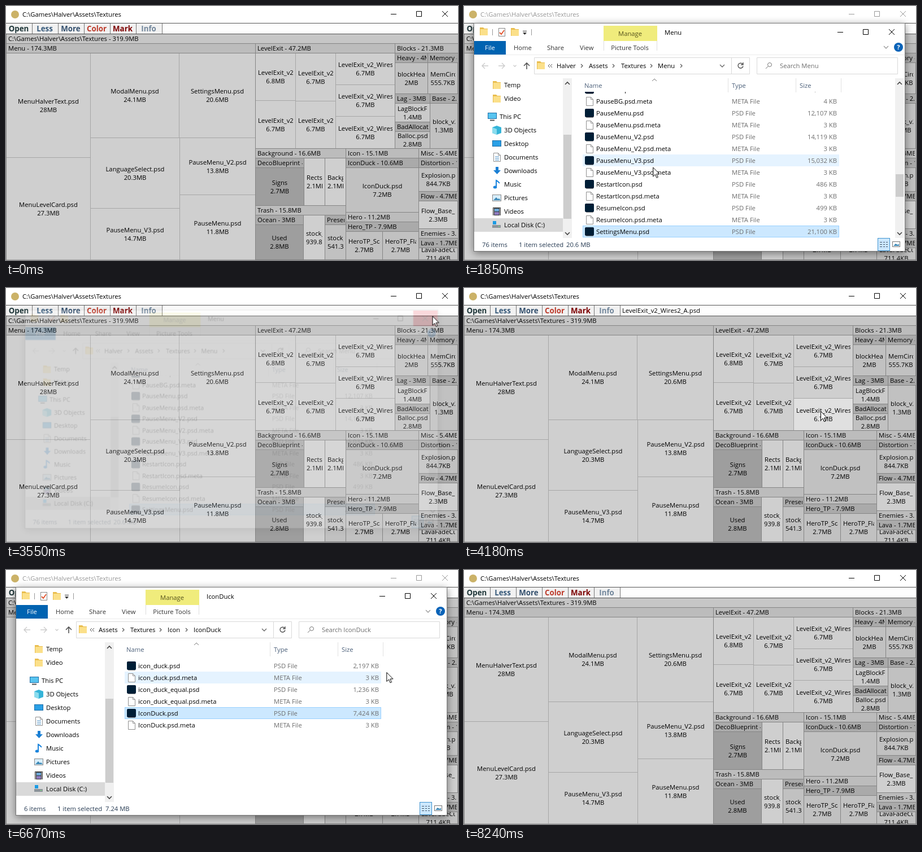
Animation, 800 px wide and 450 px high, one loop 8270 ms. Source, as an HTML page:

```html
<!DOCTYPE html>
<html lang="en">
<head>
<meta charset="utf-8">
<title>Disk usage treemap</title>
<style>
  html, body { margin: 0; width: 800px; height: 450px; overflow: hidden; background: #fff; }
  #stage { display: block; font: 11.25px "Open Sans", "Noto Sans", sans-serif; }
  text { white-space: pre; }
  .tool { font-weight: 700; font-size: 13.3px; }
  .win { transform-origin: 399px 232px; opacity: 0; }
  .frame { filter: drop-shadow(0 3px 7px rgba(0, 0, 0, .45)); }
  .hot { fill: #e0e0e0; }
</style>
</head>
<body>
<svg id="stage" width="800" height="450" viewBox="0 0 800 450"></svg>
<script>
const LOOP = 8270;
const stage = document.getElementById('stage');
const $ = sel => document.querySelector(sel);

// Drawing helpers; text is placed by its vertical middle.
const rect = (x, y, w, h, fill, more = '') =>
  `<rect x="${x}" y="${y}" width="${w}" height="${h}" fill="${fill}" ${more}/>`;
const text = (x, y, s, fill = '#000', more = '') =>
  `<text x="${x}" y="${y + 4}" fill="${fill}" ${more}>${s}</text>`;
const line = (d, stroke = '#777', w = 1) =>
  `<path d="${d}" fill="none" stroke="${stroke}" stroke-width="${w}"/>`;
const shape = (d, fill, more = '') => `<path d="${d}" fill="${fill}" ${more}/>`;
const mid = 'text-anchor="middle"', end = 'text-anchor="end"';

const captions = (x, y, color) => line(
  `M${x} ${y + .5}h10M${x + 45.5} ${y - 4.5}h9v9h-9zM${x + 91} ${y - 5}l10 10m0-10l-10 10`, color);

// Treemap: headers are [x, y, right, depth, label]
const headers = [
  [1, 50, 800, 0, 'C:\\Games\\Halver\\Assets\\Textures - 319.9MB'],
  [1, 67, 441, 1, 'Menu - 174.3MB'], [442, 67, 688, 1, 'LevelExit - 47.2MB'],
  [689, 67, 800, 1, 'Blocks - 21.3MB'], [689, 84, 746, 2, 'Heavy - 4MB'],
  [747, 84, 800, 2, 'Memory - 1MB'], [689, 156, 750, 2, 'Lag - 3MB'],
  [751, 156, 800, 2, 'Base - 2.6MB'], [689, 206, 750, 2, 'BadAllocation - 2.8MB'],
  [442, 253, 601, 1, 'Background - 16.6MB'], [602, 253, 730, 1, 'Icon - 15.1MB'],
  [731, 253, 800, 1, 'Misc - 5.4MB'], [442, 270, 527, 2, 'DecoBlueprint - 4MB'],
  [602, 270, 730, 2, 'IconDuck - 10.6MB'], [731, 270, 800, 2, 'Distortion - 1MB'],
  [731, 329, 800, 2, 'Flow - 4.7MB'], [442, 354, 601, 1, 'Trash - 15.8MB'],
  [602, 366, 730, 1, 'Hero - 11.2MB'], [442, 371, 526, 2, 'Ocean - 3MB'],
  [565, 371, 601, 2, 'Present - 1MB'], [602, 383, 730, 2, 'Hero_TP - 7.9MB'],
  [731, 395, 800, 1, 'Enemies - 3.1MB'], [731, 412, 800, 2, 'Lava - 1.7MB']
];
const LIGHT = '#cfcfcf', GRAY = '#c1c1c1', DARK = '#9e9e9e';
// [left, top, right, bottom, name, size, fill]
const cells = [
  [1, 84, 149, 268, 'MenuHalverText.psd', '28MB'], [1, 269, 149, 449, 'MenuLevelCard.psd', '27.3MB'],
  [150, 84, 306, 233, 'ModalMenu.psd', '24.1MB'], [307, 84, 441, 233, 'SettingsMenu.psd', '20.6MB'],
  [150, 234, 307, 358, 'LanguageSelect.psd', '20.3MB'], [150, 359, 307, 449, 'PauseMenu_V3.psd', '14.7MB'],
  [308, 234, 441, 334, 'PauseMenu_V2.psd', '13.8MB'], [308, 335, 441, 449, 'PauseMenu.psd', '11.8MB'],
  [442, 84, 512, 167, 'LevelExit_v2_A.psd', '6.8MB'], [442, 168, 512, 252, 'LevelExit_v2_B.psd', '6.7MB'],
  [513, 84, 583, 168, 'LevelExit_v2_C.psd', '6.7MB'], [513, 169, 583, 252, 'LevelExit_v2_D.psd', '6.7MB'],
  [584, 84, 688, 139, 'LevelExit_v2_Wires1_A.psd', '6.7MB'],
  [584, 140, 688, 195, 'LevelExit_v2_Wires1_B.psd', '6.7MB'],
  [584, 196, 688, 252, 'LevelExit_v2_Wires2_A.psd', '6.7MB'],
  [689, 101, 746, 155, 'blockHeavy.psd', '2MB', GRAY], [747, 101, 799, 155, 'MemCircle.psd', '555.7KB', GRAY],
  [689, 173, 750, 205, 'LagBlockFill.psd', '1.4MB', '#cacaca'], [751, 173, 799, 252, 'block_v2.psd', '1.3MB', GRAY],
  [689, 223, 750, 252, 'Balloc.psd', '2.8MB', GRAY], [442, 287, 527, 353, 'Signs', '2.7MB', DARK],
  [528, 270, 564, 353, 'Rects.psd', '2.1MB'], [565, 270, 601, 353, 'Background.psd', '2.1MB'],
  [442, 388, 526, 449, 'Used', '2.8MB', DARK], [527, 371, 564, 449, 'stock_1.psd', '939.8KB'],
  [565, 388, 601, 449, 'stock_2.psd', '541.3KB', GRAY], [602, 287, 730, 365, 'IconDuck.psd', '7.2MB', GRAY],
  [602, 400, 666, 449, 'HeroTP_Scale.psd', '2.7MB', GRAY], [667, 400, 730, 449, 'HeroTP_Flat.psd', '2.7MB', GRAY],
  [731, 287, 799, 328, 'Explosion.psd', '844.7KB', GRAY], [731, 346, 799, 394, 'Flow_Base_1.psd', '2.3MB'],
  [731, 429, 799, 449, 'LavaFadeCurve.psd', '711.4KB', GRAY]
];

function treemap() {
  let out = rect(0, 49, 800, 401, '#858585') + rect(1, 84, 440, 366, '#a6a6a6') + rect(442, 84, 246, 168, '#a6a6a6');
  for (const [x, y, r, depth, s] of headers) {
    out += rect(x, y, r - x, 16, ['#c6c6c6', '#bcbcbc', '#aaa'][depth]) +
      `<svg x="${x}" y="${y}" width="${r - x - 2}" height="16">${text(3, 8, s)}</svg>`;
  }
  for (const [x, y, r, b, name, size, fill = LIGHT] of cells) {
    const w = r - x, c = (w - 8) / 2, m = (b - y) / 2;
    out += rect(x, y, w, b - y, fill, 'class="cell"') +
      `<svg class="label" x="${x + 4}" y="${y}" width="${w - 8}" height="${b - y}">` +
      text(c, m - 7.5, name, '#000', mid) + text(c, m + 7.5, size, '#000', mid) + '</svg>';
  }
  return out;
}

function mainWindow() {
  const tools = [['Open', '#1d3538'], ['Less', '#36597a'], ['More', '#34506e'],
    ['Color', '#bd3b2b'], ['Mark', '#7d0000'], ['Info', '#71869b']];
  return rect(0, 0, 800, 30, '#fff') +
    '<circle cx="16" cy="15" r="7" fill="#cbb268"/>' +
    `<g id="title">${text(29, 15, 'C:\\Games\\Halver\\Assets\\Textures', 'currentColor')}${captions(681, 14, 'currentColor')}</g>` +
    rect(0, 30, 800, 20, '#fdfdfd') + rect(0, 31, 276, 18, '#f1f1f1') +
    tools.map(([s, c], i) => text(22.5 + i * 46, 40.5, s, c, mid + ' class="tool"') +
      line(`M${46.5 + i * 46} 31v18`, '#777')).join('') +
    text(280, 40, '', '#000', 'id="info"') + treemap() +
    line('M0 30.5H800M0 49.5H800', '#555');
}

// Small icons
const folder = (x, y) => shape(`M${x} ${y}h6l2 2h6v12h-14z`, '#e9bd4e') + rect(x + 1, y + 3, 13, 11, '#fbe08a');
const page = (x, y) =>
  shape(`M${x + .5} ${y + .5}h8l4 4v11h-12z`, '#fff', 'stroke="#8f8f8f"') + line(`M${x + 8.5} ${y + .5}v4h4`, '#8f8f8f');
const screen = (x, y, fill = '#2aa0e6') => rect(x + .5, y + .5, 15, 10, fill, 'stroke="#1c6ea8"');
const chevron = (x, y, c = '#666', k = 4) => line(`M${x - k} ${y - k / 2}l${k} ${k}l${k} ${-k}`, c, 1.3);
const crumb = (x, y) => line(`M${x - 2} ${y - 3}l3 3l-3 3`, '#555', 1.2);

function sidebar() {
  const items = ['3D Objects', 'Desktop', 'Documents', 'Downloads', 'Music', 'Pictures', 'Videos', 'Local Disk (C:)'];
  return rect(18, 376, 157, 24, '#d9d9d9') +
    folder(51, 133) + text(71, 140, 'Temp') + folder(51, 157) + text(71, 164, 'Video') +
    screen(42, 189, '#58c4f0') + line('M46 202.5h8', '#555', 2) + text(63, 196, 'This PC') +
    items.map((s, i) => text(71, 220 + i * 24, s)).join('') +
    shape('M50 215l8-3l8 3v10l-8 3l-8-3z', '#35b4d8') + shape('M50 215l8 3v10l-8-3z', '#8bdcee') +
    screen(50, 238) + page(52, 260) + line('M55 267h7M55 270h7M55 273h7', '#4b90c4') +
    shape('M56 285h5v6h4l-6.500 7l-6.500-7h4z', '#1a7fd4') +
    line('M57 320v-11q4 2 6 5', '#1a84dc', 2) + '<ellipse cx="55" cy="321" rx="3.300" ry="2.500" fill="#1a84dc"/>' +
    rect(50.5, 334.5, 15, 11, '#d8eefb', 'stroke="#888"') + shape('M52 344l5-5l3 3l2-1l3 3z', '#3a87b5') +
    rect(51, 357, 14, 14, '#333') + rect(54, 359, 8, 5, '#6da8d8') + rect(54, 365, 8, 5, '#8f7bc0') +
    line('M52.5 358v13M63.5 358v13', '#ddd') +
    rect(50, 388, 15, 5, '#8c9399') + rect(51, 381, 6, 6, '#1b9be4') + rect(61, 390, 2, 1, '#7f7') +
    rect(175, 128, 16, 283, '#f0f0f0') + rect(176, 228, 14, 149, '#cdcdcd') + arrows(183);
}
const arrows = x => line(`M${x - 4} 139l4-4l4 4M${x - 4} 401l4 4l4-4`, '#444', 1.6);

function fileRow([name, size], y) {
  const psd = name.endsWith('.psd');
  return page(216, y - 8) + (psd ? rect(214, y - 8, 16, 15, '#001e36', 'rx="2" class="badge"') : '') +
    text(234, y, name) + text(474, y, psd ? 'PSD File' : 'META File', '#6d6d6d') +
    text(660, y, size + ' KB', '#6d6d6d', end);
}

function explorer({ id, title, crumbs, rows, picked, status, scroll, above }) {
  const top = 169 + (scroll ? 0 : 1);
  return `<g id="${id}" class="win"><rect class="frame" x="17.500" y="30.500" width="763" height="404" fill="#fff" stroke="#777"/>` +
    // file list
    `<g class="rows">${above ? fileRow(above, 148) : ''}` +
    rect(210, 0, 454, 21, '#e5f3ff', 'class="rowhover" visibility="hidden"') +
    rect(210.5, top - 10.5 + picked * 21, 453, 20, '#cce8ff', 'stroke="#99d1ff"') +
    rows.map((r, i) => fileRow(r, top + i * 21)).join('') + '</g>' +
    rect(192, 122, 570, 30, '#fff') +
    text(213, 141, 'Name', '#4c607a') + text(474, 141, 'Type', '#4c607a') + text(594, 141, 'Size', '#4c607a') +
    line('M467.5 128v25M587.5 128v25M667.5 128v25', '#e2e2e2') + line('M333 133l4-4l4 4', '#777') +
    (scroll ? rect(763, 128, 16, 283, '#f0f0f0') + rect(764, 298, 14, 40, '#cdcdcd') + arrows(771) : '') +
    // title row and ribbon
    folder(28, 38) + line('M50.5 41v11M119.5 41v11', '#999') +
    rect(61.5, 39.5, 11, 14, '#fff', 'stroke="#888"') + line('M63 47l3 3l5-7', '#e0522c', 1.8) +
    folder(83, 39) + line('M104 44.5h7', '#333') + shape('M104 47h7l-3.500 4z', '#333') +
    rect(247, 35, 95, 27, '#f0ec7c') + text(294, 49, 'Manage', '#55521c', mid) + text(355, 47, title) +
    rect(735, 31, 45, 29, '#e81123', 'class="closehover" visibility="hidden"') + captions(661, 46, '#000') +
    rect(18, 62, 56, 24, '#0063b1') + text(46, 74, 'File', '#fff', mid) +
    text(88, 74, 'Home', '#333') + text(147, 74, 'Share', '#333') + text(205, 74, 'View', '#333') +
    text(293.5, 74, 'Picture Tools', '#333', mid) + line('M247.5 62v17M341.5 62v17', '#ddd') +
    line('M18 86.5H780', '#ececec') + chevron(747, 73, '#999') +
    '<circle cx="769" cy="73" r="8" fill="#0a63b8"/>' + text(769, 73, '?', '#fff', mid + ' font-weight="700"') +
    // address row
    line('M43 106h-11m5-5l-5 5l5 5M61 106h11m-5-5l5 5l-5 5', '#ccc', 1.4) + chevron(90, 106, '#ccc', 2.5) +
    line('M111 112v-11m-5 5l5-5l5 5', '#555', 1.6) +
    line('M124.5 91.5h381v29h-381zM473.5 92v28M518.5 91.5h249v29h-249z', '#d9d9d9') +
    folder(129, 98) + line('M152 103l-3 3l3 3M156 103l-3 3l3 3', '#555') +
    crumbs.map(([s, x, sep]) => text(x, 106, s) + (sep ? crumb(sep, 106) : '')).join('') +
    chevron(457, 106) + line('M493.500 103.500a4.500 4.500 0 1 0 .500 3M494 100v4h-4', '#555', 1.4) +
    '<circle cx="541" cy="104" r="3.500" fill="none" stroke="#777"/>' + line('M538.500 106.500l-4.500 4.500', '#777') +
    text(559, 106, 'Search ' + title, '#6d6d6d') + sidebar() +
    // status bar
    status.map(([s, x]) => text(x, 423, s, '#263a52')).join('') +
    rect(732.5, 411.5, 21, 22, '#cce8ff', 'stroke="#3f93cf"') +
    line('M736 418.5h4M736 422.5h4M736 426.5h4M742 418.5h3M742 422.5h3M742 426.5h3M747 418.5h3M747 422.5h3M747 426.5h3', '#456') +
    rect(758.5, 417.5, 13, 9, '#fff', 'stroke="#777"') + shape('M760 425l4-4l3 2l3-1v3z', '#3a87b5') + '</g>';
}

const menuWin = {
  id: 'menu', title: 'Menu', scroll: true, picked: 11, above: ['PauseBG.psd', '1,902'],
  crumbs: [['Halver', 164, 209], ['Assets', 221, 265], ['Textures', 278, 332], ['Menu', 343, 385]],
  rows: [['PauseBG.psd.meta', '4'], ['PauseMenu.psd', '12,107'], ['PauseMenu.psd.meta', '3'],
    ['PauseMenu_V2.psd', '14,119'], ['PauseMenu_V2.psd.meta', '3'], ['PauseMenu_V3.psd', '15,032'],
    ['PauseMenu_V3.psd.meta', '3'], ['RestartIcon.psd', '486'], ['RestartIcon.psd.meta', '3'],
    ['ResumeIcon.psd', '499'], ['ResumeIcon.psd.meta', '3'], ['SettingsMenu.psd', '21,100']],
  status: [['76 items', 32], ['1 item selected', 97], ['20.6 MB', 181]]
};
const duckWin = {
  id: 'duck', title: 'IconDuck', picked: 4,
  crumbs: [['Assets', 164, 208], ['Textures', 220, 274], ['Icon', 286, 320], ['IconDuck', 332]],
  rows: [['icon_duck.psd', '2,197'], ['icon_duck.psd.meta', '3'], ['icon_duck_equal.psd', '1,236'],
    ['icon_duck_equal.psd.meta', '3'], ['IconDuck.psd', '7,424'], ['IconDuck.psd.meta', '3']],
  status: [['6 items', 32], ['1 item selected', 91], ['7.24 MB', 176]]
};
const tip = '<g id="tip" opacity="0">' + rect(450.5, 399.5, 174, 47, '#fff', 'stroke="#888"') +
  ['Type: META File', 'Size: 2.09 KB', 'Date modified: 3/11/2020 04:58']
    .map((s, i) => text(455, 408 + i * 15, s, '#575757')).join('') + '</g>';

stage.innerHTML = mainWindow() + explorer(menuWin) + explorer(duckWin) + tip +
  '<g id="cursor"><path d="M.5 .5V16.500L4.200 13L6.800 18.800L9.200 17.700L6.700 12H11.700Z" fill="#fff" stroke="#000"/></g>';

// Labels too wide for their cell start at its left edge.
for (const label of document.querySelectorAll('.label text')) {
  if (label.getComputedTextLength() > label.parentNode.width.baseVal.value) {
    label.setAttribute('text-anchor', 'start');
    label.setAttribute('x', 0);
  }
}

// Motion: keys are [ms, style, easing]
function play(el, keys, easing = 'linear') {
  el.animate(keys.map(([ms, style, ease = easing]) => ({ ...style, offset: ms / LOOP, easing: ease })),
    { duration: LOOP, iterations: Infinity });
}
const toggle = (el, prop, a, b, times) => play(el,
  [0, ...times, LOOP].map((ms, i) => [ms, { [prop]: i % 2 && ms < LOOP ? b : a }]), 'step-end');

function showWindow(el, open, close) {
  const off = { opacity: 0, transform: 'scale(.95)' }, on = { opacity: 1, transform: 'scale(1)' };
  play(el, [[0, off], [open, off], [open + 250, on], [close, on], [close + 190, off], [LOOP, off]]);
}
const wins = [$('#menu'), $('#duck')];
showWindow(wins[0], 1115, 3390);
showWindow(wins[1], 5260, 7150);
toggle($('#title'), 'color', '#000', '#999', [1110, 3420, 5250, 7200]);
for (const badge of wins[0].querySelectorAll('.badge')) toggle(badge, 'opacity', 0, 1, [1500, 3600]);
toggle($('#duck .rows'), 'opacity', 0, 1, [5560, 7400]);
play($('#tip'), [[0, { opacity: 0 }], [2590, { opacity: 0 }], [2680, { opacity: 1 }],
  [2760, { opacity: 1 }], [2890, { opacity: 0 }], [LOOP, { opacity: 0 }]]);

const path = [
  [0, 610, -25], [60, 610, -25], [560, 392, 150], [850, 380, 126], [1240, 382, 122], [1480, 376, 140],
  [1950, 330, 300], [2380, 445, 376], [2680, 450, 380, 'ease-in'], [2850, 627, 158, 'ease-out'],
  [3120, 754, 48], [3480, 757, 46], [4180, 631, 218], [4330, 632, 220], [4650, 702, 236],
  [5000, 656, 306], [5360, 652, 303], [5560, 640, 296], [5980, 330, 262], [6330, 420, 256, 'ease-in'],
  [6670, 673, 182, 'linear'], [6790, 706, 62, 'ease-out'], [6960, 755, 48], [7260, 757, 46],
  [7650, 700, 90], [8150, 640, -25], [LOOP, 610, -25]
];
const cursor = $('#cursor');
play(cursor, path.map(([ms, x, y, ease]) => [ms, { transform: `translate(${x}px, ${y}px)` }, ease]), 'ease-in-out');

// Hover effects follow from where the pointer is.
const cellRects = [...document.querySelectorAll('.cell')];
const info = $('#info');
const show = (el, on) => el.setAttribute('visibility', on ? 'visible' : 'hidden');

function hover() {
  const { e: x, f: y } = new DOMMatrix(getComputedStyle(cursor).transform);
  const open = wins.find(w => getComputedStyle(w).opacity > .02);
  const hit = open ? -1 : cells.findIndex(([l, t, r, b]) => x >= l && x < r && y >= t && y < b);
  cellRects.forEach((c, i) => c.classList.toggle('hot', i === hit));
  info.textContent = hit < 0 ? '' : cells[hit][4];
  wins.forEach((w, i) => {
    const { rows, picked, scroll } = [menuWin, duckWin][i];
    const top = scroll ? 158 : 159;
    const row = Math.floor((y + .5 - top) / 21);
    const bar = w.querySelector('.rowhover');
    bar.setAttribute('y', top + row * 21);
    show(bar, w === open && x > 210 && x < 664 && row >= 0 && row < rows.length && row !== picked);
    show(w.querySelector('.closehover'), w === open && x > 735 && x < 780 && y > 31 && y < 60);
  });
  requestAnimationFrame(hover);
}
hover();
</script>
</body>
</html>
```
